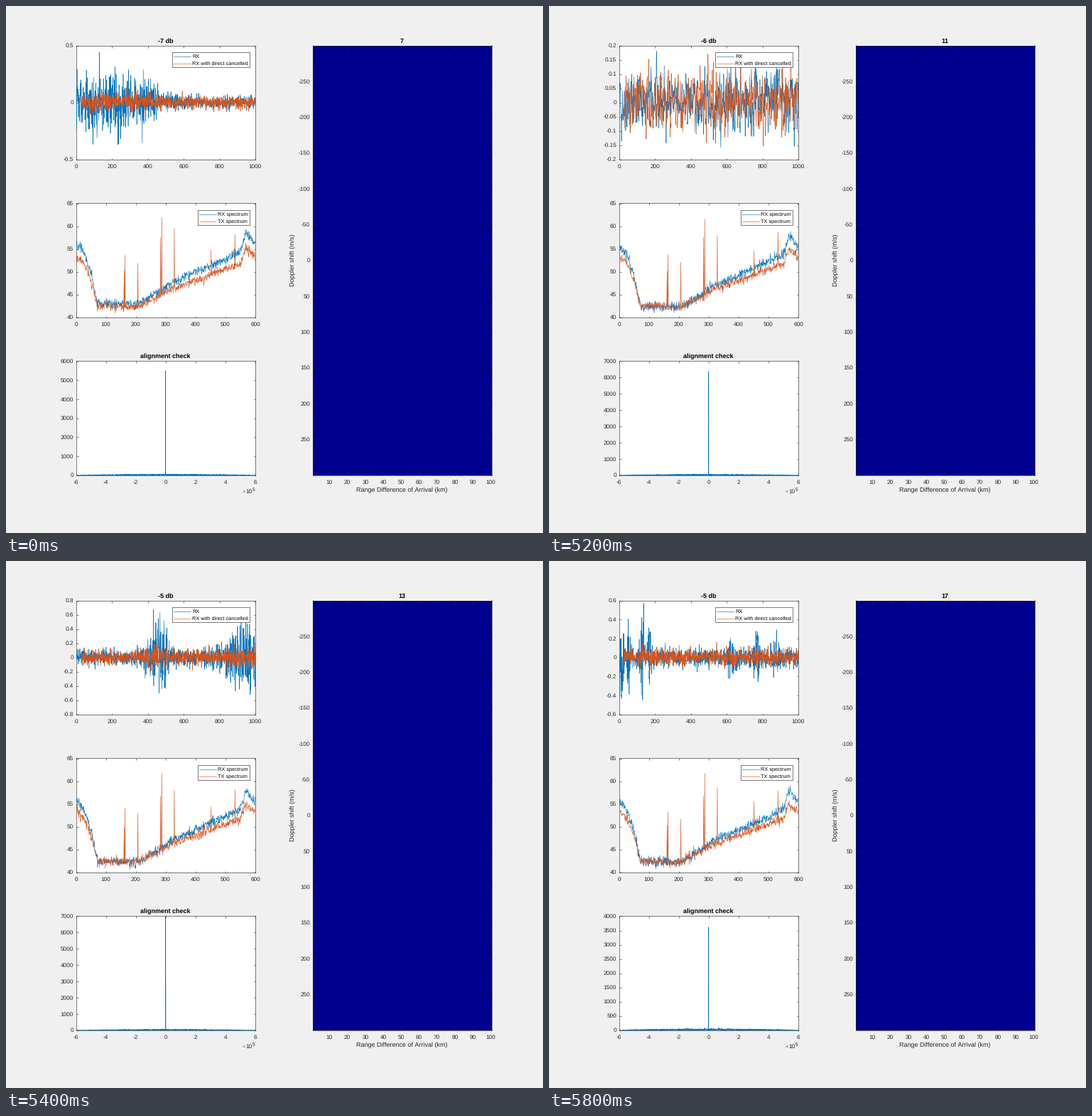
Write a matplotlib script that moves like this. It is 756x741 px and loops after 6000 ms.

```python
import math

import numpy as np
import matplotlib.pyplot as plt
from matplotlib.animation import FuncAnimation
from matplotlib.patches import Rectangle

W, H, DPI = 756, 741, 96
PX = 72 / DPI
BLUE, ORANGE, INK, NAVY = "#0072bd", "#d95319", "#262626", "#00008f"
TICK, LABEL, SMALL = 8.2 * PX, 9.0 * PX, 7.4 * PX
THIN = 0.6 * PX
HOLD = 25  # steps the first state stays on screen

plt.rcParams.update({
    "font.family": "Liberation Sans",
    "text.hinting": "none",
    "text.kerning_factor": 10,
    "text.color": INK,
    "axes.unicode_minus": False,
    "axes.edgecolor": INK,
    "axes.linewidth": THIN,
})

T = np.linspace(0, 1, 1000)
F = np.arange(600)
LAG = np.linspace(-6, 6, 2401)


def bump(center, width):
    return np.exp(-((T - center) / width) ** 2)


def bumps(centers, width):
    return sum(bump(c, width) for c in centers)


# Loudness of the received signal over time
ENVELOPES = [
    .2 + .8 / (1 + np.exp(25 * (T - .45))),
    .55 + .45 * np.sin(12 * np.pi * T) ** 2,
    1 - .35 * bump(.4, .08),
    .2 + .8 * bump(.46, .06) + .8 * bump(1, .17),
    .55 + .45 * T + .3 * bump(.22, .02),
    .2 + .8 * bumps((.015, .055, .13, .17), .012) + .3 * bumps((.63, .77, .88), .02),
]
# gain, y low, y high, y step, RX peak, cancelled peak, smoothing, alignment peak
SCENES = [
    (-7, -.5, .5, .5, .44, .14, 1, 5500),
    (-6, -.8, .6, .2, .64, .17, 1, 6580),
    (-6, -.2, .2, .05, .18, .17, 3, 6370),
    (-5, -.8, .8, .2, .67, .22, 1, 7000),
    (-5, -.3, .3, .1, .28, .2, 2, 5480),
    (-5, -.6, .6, .2, .57, .16, 1, 3620),
]
SHAPE = [(0, 56.5), (25, 54.5), (50, 50), (72, 43), (210, 42.8),
         (320, 47.5), (550, 54.3), (568, 58.5), (600, 56)]
CARRIERS = {161: 50, 164: 53.5, 207: 52, 283: 57, 287: 62,
            329: 58.2, 452: 55, 532: 58.3}
BASE = np.interp(F, *zip(*SHAPE))


def noise(rng, env, peak, width):
    n = np.convolve(rng.normal(size=T.size), np.ones(width), "same") * env
    return n * peak / np.abs(n).max()


def make_state(k):
    rng = np.random.RandomState(40 + k)
    *_, rx_peak, tx_peak, width, align = SCENES[k]
    env = ENVELOPES[k]
    rx = noise(rng, env, rx_peak, width)
    tx = noise(rng, .6 + .4 * env, tx_peak, width)
    tx[:28] = np.nan

    rx_spec = BASE - .6 * (k > 0) + rng.normal(0, .55, F.size)
    tx_spec = 42.3 + .82 * (BASE - 42.8) + rng.normal(0, .5, F.size)
    for x, level in CARRIERS.items():
        tx_spec[x] = level + rng.normal(0, .5)

    corr = np.abs(rng.normal(size=LAG.size)) * 24 * (1 - np.abs(LAG) / 6) ** .6
    corr[LAG.size // 2] = align
    specks = rng.uniform((440, 65), (675, 650), (4 * (k > 0), 2))
    return rx, tx, rx_spec, tx_spec, corr, specks


STATES = [make_state(k) for k in range(len(SCENES))]

fig = plt.figure(figsize=(W / DPI, H / DPI), dpi=DPI, facecolor="#f0f0f0")


def panel(x0, y0, x1, y1, xlim, xticks, tick=2.5):
    ax = fig.add_axes([x0 / W, 1 - y1 / H, (x1 - x0) / W, (y1 - y0) / H])
    ax.set_xlim(xlim)
    ax.tick_params(direction="in", top=True, right=True, length=tick * PX,
                   width=THIN, color=INK, labelcolor=INK, labelsize=TICK)
    ax.tick_params(axis="x", pad=12 * PX)
    ax.tick_params(axis="y", pad=3.5 * PX)
    ax.set_xticks(xticks, [f"{v:g}" for v in xticks])
    for lab in ax.get_xticklabels():
        lab.set_va("baseline")
    return ax


def set_y(ax, lo, hi, step):
    ticks = np.round(np.linspace(lo, hi, round((hi - lo) / step) + 1), 4) + 0.0
    ax.set_ylim(lo, hi)
    ax.set_yticks(ticks, [f"{v:g}" for v in ticks])


def curve(ax, x, color):
    return ax.plot(x, np.zeros(len(x)), color=color, lw=THIN, zorder=3)[0]


ax_sig = panel(98.5, 55.5, 351, 215.5, (0, 1000), range(0, 1001, 200))
ax_spec = panel(98.5, 277.5, 351, 437.5, (0, 600), range(0, 601, 100))
ax_corr = panel(98.5, 499.5, 351, 659.5, (-6, 6), range(-6, 7, 2))
ax_map = panel(431.5, 55.5, 683.5, 659.5, (.5, 100.5), range(10, 101, 10), 6)
ax_map.set_facecolor(NAVY)
ax_map.set_ylim(300, -300)
ax_map.set_yticks(range(-250, 251, 50))
set_y(ax_spec, 40, 65, 5)

lines = [curve(ax_sig, 1000 * T, BLUE), curve(ax_sig, 1000 * T, ORANGE),
         curve(ax_spec, F, BLUE), curve(ax_spec, F, ORANGE),
         curve(ax_corr, LAG, BLUE)]

# Overlay in pixel coordinates for text and legends
page = fig.add_axes([0, 0, 1, 1], zorder=5)
page.set(xlim=(0, W), ylim=(H, 0))
page.axis("off")


def write(x, y, s, size=LABEL, ha="center", **kw):
    return page.text(x, y, s, fontsize=size, ha=ha, va="baseline", **kw)


def title(x, y, s=""):
    return write(x, y, s, weight="bold", color="black")


def legend(x, y, x1, names):
    page.add_patch(Rectangle((x, y), x1 - x, 21, fc="white", ec=INK, lw=THIN))
    for i, (name, color) in enumerate(zip(names, (BLUE, ORANGE))):
        row = y + 6 + 10 * i
        page.plot([x + 2.5, x + 26.5], [row, row], color=color, lw=THIN)
        write(x + 28.8, row + 2.7, name, SMALL, "left", color="black")


legend(233.5, 64.5, 342.5, ("RX", "RX with direct cancelled"))
legend(269.5, 286.5, 342.5, ("RX spectrum", "TX spectrum"))
gain_title = title(225, 51.5)
count_title = title(557.5, 51.5)
title(224.7, 495.5, "alignment check")
write(557.3, 683, "Range Difference of Arrival (km)")
write(406.3, 357.5, "Doppler shift (m/s)", rotation=90, rotation_mode="anchor")
write(332, 685.3, "×", SMALL, "left", color="#606060")
write(337, 685.3, "10", TICK, "left")
write(346.6, 681.8, "5", 6.6 * PX, "left")
speck_dots, = page.plot([], [], "s", color="#0000b0", ms=1.2 * PX, mew=0)


def update(i):
    k = max(0, i - HOLD + 1)
    gain, lo, hi, step, *_, align = SCENES[k]
    *curves, specks = STATES[k]
    for line, y in zip(lines, curves):
        line.set_ydata(y)
    set_y(ax_sig, lo, hi, step)
    top = 1000 * math.ceil(align / 1000)
    set_y(ax_corr, 0, top, 1000 if top > 4000 else 500)
    gain_title.set_text(f"{gain} db")
    count_title.set_text(f"{7 + 2 * k}")
    speck_dots.set_data(*specks.T)


anim = FuncAnimation(fig, update, frames=HOLD + len(SCENES) - 1, interval=200,
                     init_func=lambda: update(0), repeat=True, repeat_delay=0)
plt.show()
```
